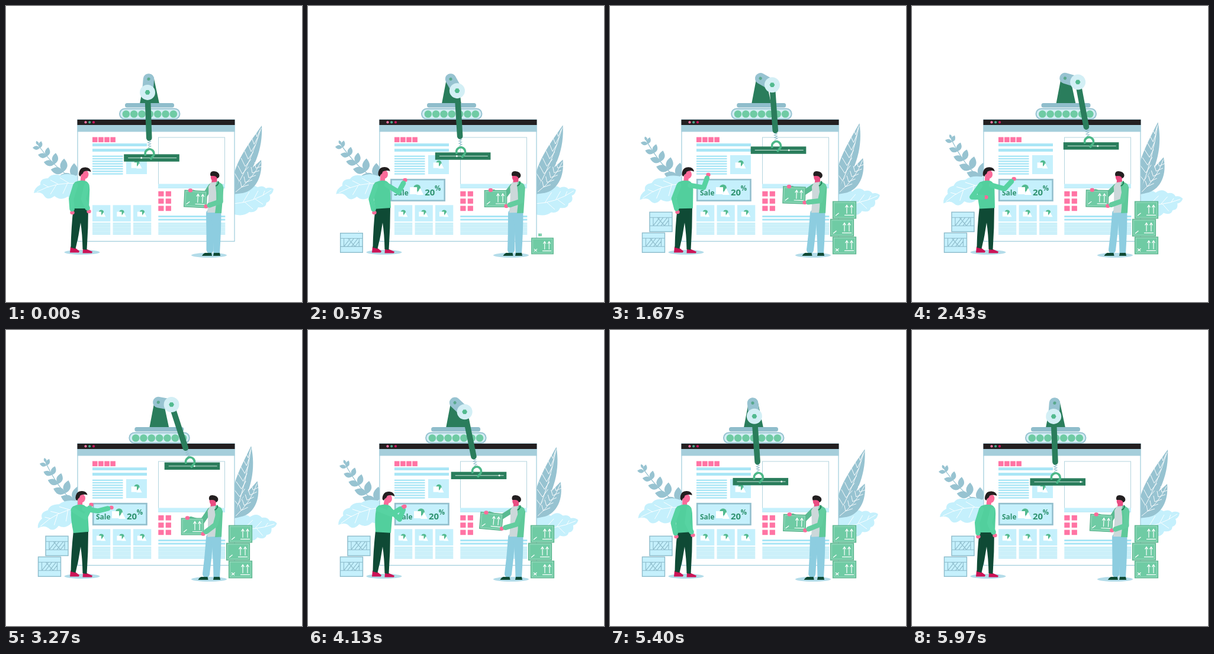
An HTML page for the animation above (6 s loop, 500x500 px).

```html
<!DOCTYPE html>
<html lang="en">
<head>
<meta charset="utf-8">
<title>Building a web page</title>
<style>
html, body { margin: 0; width: 100%; height: 100%; overflow: hidden; background: #fff; }
svg { display: block; width: 100vw; height: 100vh; }
text { font: bold 12px "Noto Sans", sans-serif; fill: #2f9370; }
.vein { fill: none; stroke: #fff; stroke-width: .9; }
.sleeve { fill: none; stroke-linecap: round; stroke-linejoin: round; }
</style>
</head>
<body>
<svg id="stage" viewBox="0 0 500 500"></svg>
<script>
const SKY = '#c5f0fc', LINE = '#a9e6f6', STEEL = '#97c3d1', FOREST = '#2a7d5c',
  MINT = '#6fcba4', PINK = '#ff74a4', SKIN = '#fb6b9a', INK = '#231f20';
const stage = document.getElementById('stage');

const rect = (x, y, w, h, fill, more = '') =>
  `<rect x="${x}" y="${y}" width="${w}" height="${h}" fill="${fill}" ${more}/>`;
const disc = (x, y, r, fill, more = '') =>
  `<circle cx="${x}" cy="${y}" r="${r}" fill="${fill}" ${more}/>`;
const oval = (x, y, rx, ry, fill) =>
  `<ellipse cx="${x}" cy="${y}" rx="${rx}" ry="${ry}" fill="${fill}"/>`;
const path = (d, fill, more = '') => `<path d="${d}" fill="${fill}" ${more}/>`;
const group = (id, body) => `<g id="${id}">${body}</g>`;
const rep = (n, f) => Array.from({ length: n }, (_, i) => f(i)).join('');
const rows = (x, y, w, h, gap, n) => rep(n, i => rect(x, y + i * gap, w, h, LINE));

// Picture placeholder: disc, square and triangle
const icon = (x, y, k) => `<g transform="translate(${x} ${y}) scale(${k})">
  ${disc(0, 0, 6, '#52ba8f')}${rect(-12, -1.5, 12, 12, '#fff')}
  ${path('M5 0L11 11.5H-1Z', '#fff')}</g>`;

// Plants
const leaf = (x, y, len, angle) => path(
  `M0 0Q${len * .45} ${-len * .55} ${len} 0Q${len * .45} ${len * .55} 0 0`, STEEL,
  `transform="translate(${x} ${y}) rotate(${angle})"`);
const nodes = [[57, 240], [69, 254], [82, 267], [97, 280], [115, 291]];
const branch = path('M124 299Q82 276 51 230', 'none', `stroke="${STEEL}" stroke-width="1.3"`) +
  nodes.map(([x, y], i) => leaf(x, y, 12 + i * 3.4, -78 - i * 3) +
    leaf(x, y, 12 + i * 3.2, 184 + (i < 1 ? 0 : 6))).join('') + leaf(55, 235, 8, -120);
const feathers = group('tall',
    path('M384 316C377 275 405 240 432 202C434 240 421 278 388 312Z', STEEL) +
    `<path class="vein" d="M388 308Q414 262 431 206${rep(7, i =>
      `M${394 + i * 5} ${296 - i * 12.5}l${-8 + i * .6} -14m${8 - i * .6} 14l${12 - i * 1.1} -12`)}"/>`) +
  group('short',
    path('M384 318C390 292 414 276 431 260C434 290 420 312 400 316Z', STEEL) +
    `<path class="vein" d="M388 314Q416 294 430 264${rep(5, i =>
      `M${398 + i * 6} ${306 - i * 8}l-2 -10m2 10l12 -4`)}"/>`);
const lobes = group('lobeL',
    path(`M126 290Q106 280 92 286Q77 282 71 291Q57 291 58 302Q48 307 47 316Q59 313 64 320
      Q70 330 82 321Q92 330 104 322Q115 329 126 322Z`, SKY) +
    `<path class="vein" d="M124 300Q85 296 52 314M106 299l-15 -9M104 299l-8 18M88 301l-13 -7M85 302l-10 16M72 306l-9 -5"/>`) +
  group('lobeR',
    path(`M382 318Q395 305 405 310Q414 299 425 306Q434 302 439 308Q446 305 452 309Q451 317 445 319
      Q449 329 440 332Q439 342 426 340Q422 350 411 348Q400 357 382 351Z`, SKY) +
    `<path class="vein" d="M384 334Q418 332 448 311M400 332l11 -18M403 331l14 12M418 327l8 -15M421 326l13 9M434 320l3 -8"/>`);

// Browser window
const page = rect(121, 192, 265, 205.5, '#fff', 'stroke="#a3cfdd" stroke-width="1.3"') +
  rect(120.5, 201, 266, 11.5, '#a5cedb') + rect(120.5, 192, 266, 9, INK) +
  disc(134.5, 196.4, 2.1, PINK) + disc(141.2, 196.4, 2.1, '#4aa88a') + disc(148, 196.4, 2.1, '#c8175d') +
  rep(4, i => rect(146 + i * 10.1, 221.5, 8.6, 8.6, PINK)) +
  rows(146, 232.2, 92, 4.8, 9, 2) + rows(146, 252.6, 51.5, 2.4, 4.25, 8) +
  rect(203, 252, 35, 32, SKY) + icon(221, 265.5, .78) +
  rep(3, i => {
    const x = 146 + i * 34.5;
    return rect(x, 336.3, 30.3, 27.7, SKY) + icon(x + 15, 348.5, .68) + rows(x, 366.3, 30.3, 1.5, 2.6, 8);
  }) +
  rect(257.5, 222, 112, 85.5, '#fff', 'stroke="#b3d4de" stroke-width="1"') +
  rect(257, 300.5, 113, 7.3, SKY) +
  rep(6, i => rect(257.3 + i % 2 * 12.4, 313 + (i >> 1) * 12.3, 9.2, 8.6, PINK)) +
  rows(257.3, 354, 113, 3, 5.4, 2) + rows(257.3, 366.3, 113, 1.5, 2.6, 8);
const label = (x, y, size, words) => `<text x="${x}" y="${y}" style="font-size:${size}px">${words}</text>`;
const banner = group('banner',
  rect(147.2, 293.2, 90.3, 35.6, SKY, 'stroke="#93bfcd" stroke-width="2.6"') + icon(191, 307.5, 1) +
  label(152, 319.6, 12, 'Sale') + label(204, 319.6, 15, '20') + label(220.8, 312.2, 11.5, '%'));

// Crane; its lower parts are placed by joint angles
const crane = group('base',
    path('M234 123Q235 115 242 115Q248 115 250 123L259 165H226Z', FOREST) +
    rect(201, 164, 83, 7.4, '#8fbdcb', 'rx="3.5"') +
    rect(192, 173.5, 101.5, 17.5, '#d5eef5', `rx="8.7" stroke="${STEEL}" stroke-width="2"`) +
    rep(7, i => disc(202.8 + i * 13.35, 182.5, 6.3, MINT))) +
  group('link', `<path d="M0 0V22.6" stroke="${STEEL}" stroke-width="18.5" stroke-linecap="round"/>` +
    disc(0, 0, 2.6, '#5aa98e')) +
  group('arm',
    path('M-2.5 81l5 2l-5 2l5 2l-5 2l5 2l-5 2', 'none', 'stroke="#93bfcd" stroke-width="1"') +
    path('M0 5V77', 'none', `stroke="${FOREST}" stroke-width="9.6" stroke-linecap="round"`)) +
  group('wheel', disc(0, 0, 13, '#d3eff5') + path('M-4.4 0L-2.2 -3.8H2.2L4.4 0L2.2 3.8H-2.2Z', '#52ba8f')) +
  group('hook', rect(-43.5, 1.3, 93.6, 12.4, FOREST) +
    path('M-36.5 7.5H45.5', 'none', 'stroke="#d3e8df" stroke-width="1"') +
    `<circle id="knob" cy="7.5" r="1.5" fill="#fff"/>` +
    path('M-6.8 3.5A7.4 7.4 0 1 1 5 5.5L1 10', 'none', 'stroke="#4db889" stroke-width="3.8"'));

// Parcels, drawn around their bottom centre
const parcel = (w, h) => rect(-w / 2, -h, w, h, MINT, 'stroke="#5db48e" stroke-width="1.2"') +
  rect(-w / 2 + 1.8, -h + 1.8, w - 3.6, h - 3.6, 'none', 'stroke="#a5dfc6" stroke-width=".8"') +
  path('M0 -5.5H16M4 -8V-22M1.5 -18.5L4 -22.5L6.5 -18.5M12 -8V-22M9.5 -18.5L12 -22.5L14.5 -18.5M-15 -4.5L-9.5 -9',
    'none', 'stroke="#fff" stroke-width="1.2"');
const cross = path('M-15 -9L-10 -4.5', 'none', 'stroke="#fff" stroke-width="1.2"');
const crate = rect(-19, -33, 38, 33, SKY, 'stroke="#8dbccb" stroke-width="1.4"') +
  path('M-19 -24H19M-19 -10H19M-13 -24V-10M13 -24V-10M-13 -10L-2 -24M-7 -10L4 -24M0 -10L11 -24M6 -10L13 -19M-6 -24L6 -10',
    'none', 'stroke="#8dbccb" stroke-width="1.1"');
// [x, bottom, body, start, duration]
const stack = [
  [73.5, 416.3, crate, 180, 420], [86, 381.2, crate, 530, 400],
  [396, 418.8, parcel(39, 28.6) + cross, 210, 430],
  [392, 388.8, parcel(39, 28.6), 470, 400], [396, 358.8, parcel(39, 28.6), 750, 400]
];

// People
const limb = (id, color, w) =>
  `<path id="${id}" class="sleeve" stroke="${color}" stroke-width="${w}"/>`;
const hand = id => group(id, oval(0, 0, 3.7, 3.2, SKIN));
const shadow = (x, y) => oval(x, y, 30, 4, '#b3dce9');
const worker = shadow(128.5, 416) +
  path('M109 406.5L116 408L124 414L123 416.5H108Z', '#cc1457') +
  path('M130 410L137 411L146 415L145 417.5H129.5Z', '#cc1457') +
  path('M114 339H139Q139 375 136.5 412L129.5 411Q129 385 126 366Q123 388 117.5 410L109.5 408Q110 375 114 339Z', '#0f4a35') +
  group('lean1',
    path('M126 287H134L133 298Q129 301 125 298Z', SKIN) + oval(132.5, 284.5, 6.5, 7.5, SKIN) +
    path('M125 288Q121 286 123.5 279Q126 272 134 272.5Q142 273 143 280Q136 277 130.5 280Q129.5 284 127 284.5Z', INK) +
    path('M117 297Q127 293 135 296Q141 299 141 310L140 342H114Q111 318 113 305Q114 299 117 297Z', '#52cf9d')) +
  hand('handA') + limb('sleeveA', '#57d3a2', 8.5) + hand('handB') + limb('sleeveB', '#57d3a2', 8.5);
const porter = shadow(343, 421) + limb('legA', '#8dcde0', 12) +
  path('M346 345H363.5Q363.5 380 361 418H350.5Q350 380 346 345Z', '#8dcde0') +
  path('M351 417H361L362 422H350Z', '#0f4a35') +
  group('shoe', path('M-4 -3H7L8 2H-9Q-8 -1 -4 -3Z', '#0f4a35')) +
  limb('farSleeve', '#5abb92', 8.5) +
  group('lean2',
    path('M348 290H356L357 301H347Z', '#ea4d82') + oval(351.5, 289, 5.7, 7, '#ea4d82') +
    path('M345.5 287Q343.5 279 351 279Q360.5 280 360.5 287Q359.5 291 356.5 291Q355.5 287 350 287Z', INK) +
    path('M346 298L357 297L359 349H340Q343 320 342 305Z', '#ccd8da') +
    path('M356 296Q366 299 367.5 307L364 350H353Q357 325 354 304Z', '#5fc99a') +
    path('M354 304Q360 302 358.5 296', 'none', 'stroke="#1f7a55" stroke-width="1.8"')) +
  group('held', `<g transform="translate(0 14)">${parcel(37.5, 28)}</g>`) +
  hand('farHand') + hand('nearHand') + limb('nearSleeve', '#63cd9f', 8.5);

stage.innerHTML = group('branch', branch) + lobes + feathers + page + banner +
  stack.map((s, i) => group('box' + i, s[2])).join('') + crane + worker + porter;

const $ = id => document.getElementById(id);
const move = (id, x, y, angle = 0, k = 1) =>
  $(id).setAttribute('transform', `translate(${x} ${y}) rotate(${angle}) scale(${k})`);
const turn = (id, angle, x, y) => $(id).setAttribute('transform', `rotate(${angle} ${x} ${y})`);
const clamp = v => Math.min(1, Math.max(0, v));
const ease = (t, from, to) => (1 - Math.cos(Math.PI * clamp((t - from) / (to - from)))) / 2;
const rad = Math.PI / 180;

// Smooth curve through poses, without overshoot
const TIMES = [0, 570, 1670, 3270, 4130, 4870, 5990];
function pose(t, ...v) {
  const last = TIMES.length - 1;
  const slope = i => (v[i + 1] - v[i]) / (TIMES[i + 1] - TIMES[i]);
  const tangent = i => {
    if (i === 0) return slope(0);
    if (i === last) return slope(last - 1);
    const a = slope(i - 1), b = slope(i);
    return a * b > 0 ? 2 * a * b / (a + b) : 0;
  };
  let i = 0;
  while (i < last - 1 && t > TIMES[i + 1]) i++;
  const d = TIMES[i + 1] - TIMES[i], u = clamp((t - TIMES[i]) / d), w = 1 - u;
  return v[i] * w * w * (1 + 2 * u) + v[i + 1] * u * u * (3 - 2 * u) +
    d * u * w * (tangent(i) * w - tangent(i + 1) * u);
}

function rotated(x, y, cx, cy, angle) {
  const s = Math.sin(angle * rad), c = Math.cos(angle * rad);
  return [cx + (x - cx) * c - (y - cy) * s, cy + (x - cx) * s + (y - cy) * c];
}

// Two equal bones from shoulder to hand; side picks the way the elbow points
function reach(sleeve, palm, [sx, sy], hx, hy, bone, side) {
  const dx = hx - sx, dy = hy - sy, d = Math.hypot(dx, dy);
  const bend = Math.sqrt(Math.max(0, bone * bone - d * d / 4)) / d * side;
  const ex = sx + dx / 2 - dy * bend, ey = sy + dy / 2 + dx * bend;
  const cuff = 1 - 6 / bone;
  $(sleeve).setAttribute('d',
    `M${sx} ${sy}L${ex} ${ey}L${ex + (hx - ex) * cuff} ${ey + (hy - ey) * cuff}`);
  move(palm, hx, hy);
}

function draw(t) {
  const sway = (1 - Math.cos(t / 3000 * Math.PI)) / 2;
  turn('branch', 11 * sway, 122, 295);
  turn('lobeL', -15 * sway, 123, 299);
  turn('lobeR', 15 * sway, 386, 340);
  turn('tall', -9.5 * sway, 386, 309);
  turn('short', -7 * sway, 388, 312);

  const glide = 1 - clamp((t - 100) / 800);
  move('banner', -40 * glide * glide, 0);
  $('banner').setAttribute('opacity', clamp((t - 100) / 300));
  stack.forEach(([x, y, , start, span], i) => move('box' + i, x, y, 0, ease(t, start, start + span)));

  const shift = 17.5 * (ease(t, 600, 2200) - ease(t, 2900, 5100));
  const a = pose(t, -5, 29, 61, 80, 47, 20, -5), b = pose(t, 2, 3.5, 4, 18, 11.5, 6, 2);
  const px = 241 + shift, py = 123.4 - shift * .08;
  const ex = px + 22.6 * Math.sin(a * rad), ey = py + 22.6 * Math.cos(a * rad);
  const drop = 104.5 - b * .12;
  move('base', shift, 0);
  move('link', px, py, -a);
  move('arm', ex, ey, -b);
  move('wheel', ex, ey);
  move('hook', ex + drop * Math.sin(b * rad), ey + drop * Math.cos(b * rad) - 1);
  $('knob').setAttribute('cx', pose(t, -14, -7, 21, 7, 38, 37, 42));

  const lean1 = pose(t, .5, -4, -1, -5, 3, -6, .5);
  turn('lean1', lean1, 126, 342);
  reach('sleeveA', 'handA', rotated(136, 303, 126, 342, lean1),
    pose(t, 140, 164, 166, 178, 163, 140, 140), pose(t, 347, 294, 285, 300, 298, 346, 347), 23.2, 1);
  reach('sleeveB', 'handB', rotated(117, 303, 126, 342, lean1),
    pose(t, 112, 112, 114, 144, 161, 112, 112), pose(t, 349, 349, 348, 295, 299, 349, 349), 23.6, 1);

  const lean2 = pose(t, 0, -1, -1.5, -2, -.5, -4.5, 0);
  const bx = pose(t, 320, 317, 311, 315, 309.5, 307.5, 320);
  const by = pose(t, 326, 325.5, 319.5, 332, 323, 326, 326);
  const foot = pose(t, 340, 338.5, 333.5, 333.5, 333.5, 334.5, 340);
  turn('lean2', lean2, 352, 348);
  move('held', bx, by, pose(t, 3, 0, 2, 0, 5, 1, 3));
  $('legA').setAttribute('d', `M344 350L${(foot + 349) / 2} 384L${foot + 4.5} 412`);
  move('shoe', foot, 420);
  reach('farSleeve', 'farHand', rotated(346, 304, 352, 348, lean2), bx - 8.5, by - 14.5, 25, -1);
  reach('nearSleeve', 'nearHand', rotated(362, 304, 352, 348, lean2), bx + 18, by + 12.5, 26, -1);
}

const start = performance.now();
function tick() {
  draw((performance.now() - start) % 6000);
  requestAnimationFrame(tick);
}
tick();
</script>
</body>
</html>
```
